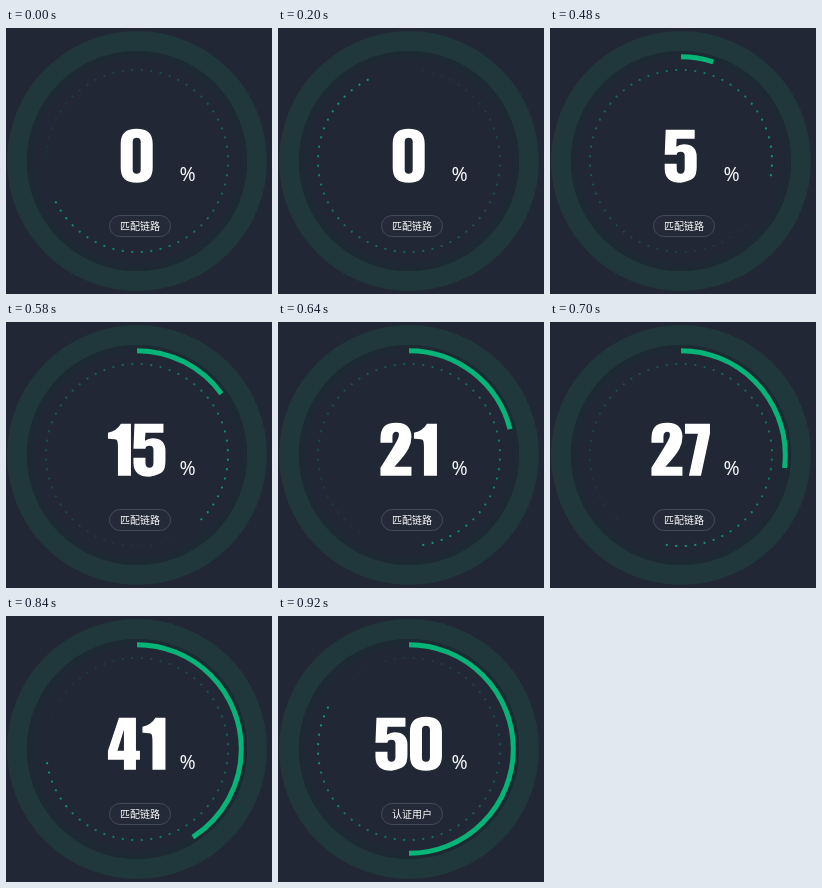
An HTML page that plays this animation: 266x266 px, repeating every 960 ms.

```html
<!DOCTYPE html>
<html lang="zh">
<head>
<meta charset="utf-8">
<style>
  html, body { margin: 0; width: 100%; height: 100%; overflow: hidden; background: #212734; }
  svg { display: block; width: 100vw; height: 100vh; }
</style>
</head>
<body>
<svg viewBox="0 0 266 266">
  <g fill="none">
    <circle cx="131" cy="133" r="120" stroke="#20373b" stroke-width="20"/>
    <circle cx="131" cy="133" r="107.8" stroke="#1d2a33" stroke-width="4.4"/>
    <circle cx="131" cy="133" r="104" stroke="#1f2935" stroke-width="4"/>
    <circle id="arc" cx="131" cy="133" r="104.3" stroke="#05b477" stroke-width="5"
      pathLength="100" transform="rotate(-90 131 133)"/>
  </g>
  <g id="dots" fill="#0bae7c"></g>
  <g id="number" role="img" fill="#fff" fill-rule="evenodd"></g>
  <text x="173.5" y="153" font-family="'Noto Sans', sans-serif" font-size="19.5" fill="#f4f5f7">%</text>
  <rect x="103.5" y="187.5" width="61" height="21" rx="10.5" fill="#242a38" stroke="#434a5a"/>
  <text id="label" x="134" y="202" text-anchor="middle" fill="#fff" font-size="10"
    font-family="'Noto Sans CJK SC', 'Noto Sans CJK', sans-serif"></text>
</svg>
<script>
const NS = 'http://www.w3.org/2000/svg';
const LOOP = 960, FRAME = 20, DOTS = 60;
const CX = 131, CY = 133;
const $ = id => document.getElementById(id);

function add(parent, tag, attrs) {
  const el = document.createElementNS(NS, tag);
  for (const key in attrs) el.setAttribute(key, attrs[key]);
  return parent.appendChild(el);
}

// Heavy condensed numerals: [width, outline]
const glyphs = [
  [32, 'M16 0C27 0 32 5 32 15V39C32 49 27 54 16 54S0 49 0 39V15C0 5 5 0 16 0ZM16 9Q12 9 12 13V41Q12 45 16 45T20 41V13Q20 9 16 9Z'],
  [23, 'M23 1V53H10V25Q10 19 9 17.5T1 16H0V10Q9 8 13 1Z'],
  [31, 'M31 44V53H0V45Q14 23 17 17Q18.5 14 18.5 12Q18.5 9 16 9Q12 9 12 14V20H0V16Q0 8 3.5 4T16 0Q24 0 27.5 4T31 14Q31 20 28 26T14 44Z'],
  [32, 'M26 25Q32 28 32 36V40Q32 48 28 51T16 54Q7 54 3.5 50T0 39V33H12V40Q12 45 16 45Q20 45 20 40V35Q20 30 18.5 29T11 28V21Q17 21 18.5 20T20 15V13Q20 9 16 9T12 13V18H0V14Q0 6 4 3T16 0Q24 0 28 4T32 14Q32 20 30.5 22T26 25Z'],
  [32, 'M28 1V34H32V43H28V53H16V43H0V34L11 1ZM16 34V13L9.5 34Z'],
  [32, 'M30 1V10H12L11.5 18Q15 15.5 19 15.5Q32 15.5 32 28V38Q32 46 29 49T16 54Q0 54 0 40V35H12V40Q12 45 16 45T20 40V27Q20 23 16 23T12 26H0L1 1Z'],
  [32, 'M32 16H20V13Q20 9 16 9T12 13V22Q14 18 20 18Q32 18 32 30V39Q32 54 16 54T0 39V15Q0 0 16 0T32 15ZM16 26Q12 26 12 30V41Q12 45 16 45T20 41V30Q20 26 16 26Z'],
  [25, 'M25 1V11L16 53H4L13 11H0V1Z'],
  [32, 'M27 25Q32 28 32 36V40Q32 54 16 54T0 40V36Q0 28 5 25Q0 22 0 15V13Q0 0 16 0T32 13V15Q32 22 27 25ZM16 9Q12 9 12 13V17Q12 21 16 21T20 17V13Q20 9 16 9ZM16 30Q12 30 12 34V41Q12 45 16 45T20 41V34Q20 30 16 30Z'],
  [32, 'M0 38H12V41Q12 45 16 45T20 41V32Q18 36 12 36Q0 36 0 24V15Q0 0 16 0T32 15V39Q32 54 16 54T0 39ZM16 28Q20 28 20 24V13Q20 9 16 9T12 13V24Q12 28 16 28Z']
];

const dots = Array.from({ length: DOTS }, (_, i) => {
  const a = (i * 6 + 3) * Math.PI / 180;
  return add($('dots'), 'circle', {
    cx: CX + 91 * Math.sin(a), cy: CY - 91 * Math.cos(a), r: 1.15
  });
});

function percentAt(t) {
  if (t < 440) return 0;
  return t >= 920 ? 50 : 1 + (t - 440) / 10;
}

// The chaser jumps three dots every 40 ms, with a short lag late in the loop.
function headAt(t) {
  const lag = t >= 680 && t < 800 ? 20 : 0;
  return 40 + 3 * Math.floor((t - lag) / 40);
}

let shown = -1;
function drawNumber(n) {
  if (n === shown) return;
  shown = n;
  const group = $('number'), gap = 2.5;
  const digits = [...String(n)].map(d => glyphs[d]);
  const total = digits.reduce((sum, g) => sum + g[0] + gap, -gap);
  let x = 130.7 - total / 2;
  group.replaceChildren();
  group.setAttribute('aria-label', n);
  for (const [width, d] of digits) {
    add(group, 'path', { d, transform: `translate(${x} 100.7)` });
    x += width + gap;
  }
}

function draw(ms) {
  const t = Math.floor((ms % LOOP) / FRAME) * FRAME;
  const n = percentAt(t), head = headAt(t);
  drawNumber(n);
  $('arc').setAttribute('stroke-dasharray', `${n} 100`);
  $('arc').setAttribute('visibility', n ? 'visible' : 'hidden');
  $('label').textContent = n < 50 ? '匹配链路' : '认证用户';
  dots.forEach((dot, i) => {
    const age = (head - i + 2 * DOTS) % DOTS;
    dot.setAttribute('opacity', 0.85 * (1 - age / DOTS));
  });
}

const start = performance.now();
function tick() {
  draw(performance.now() - start);
  requestAnimationFrame(tick);
}
tick();
</script>
</body>
</html>
```
